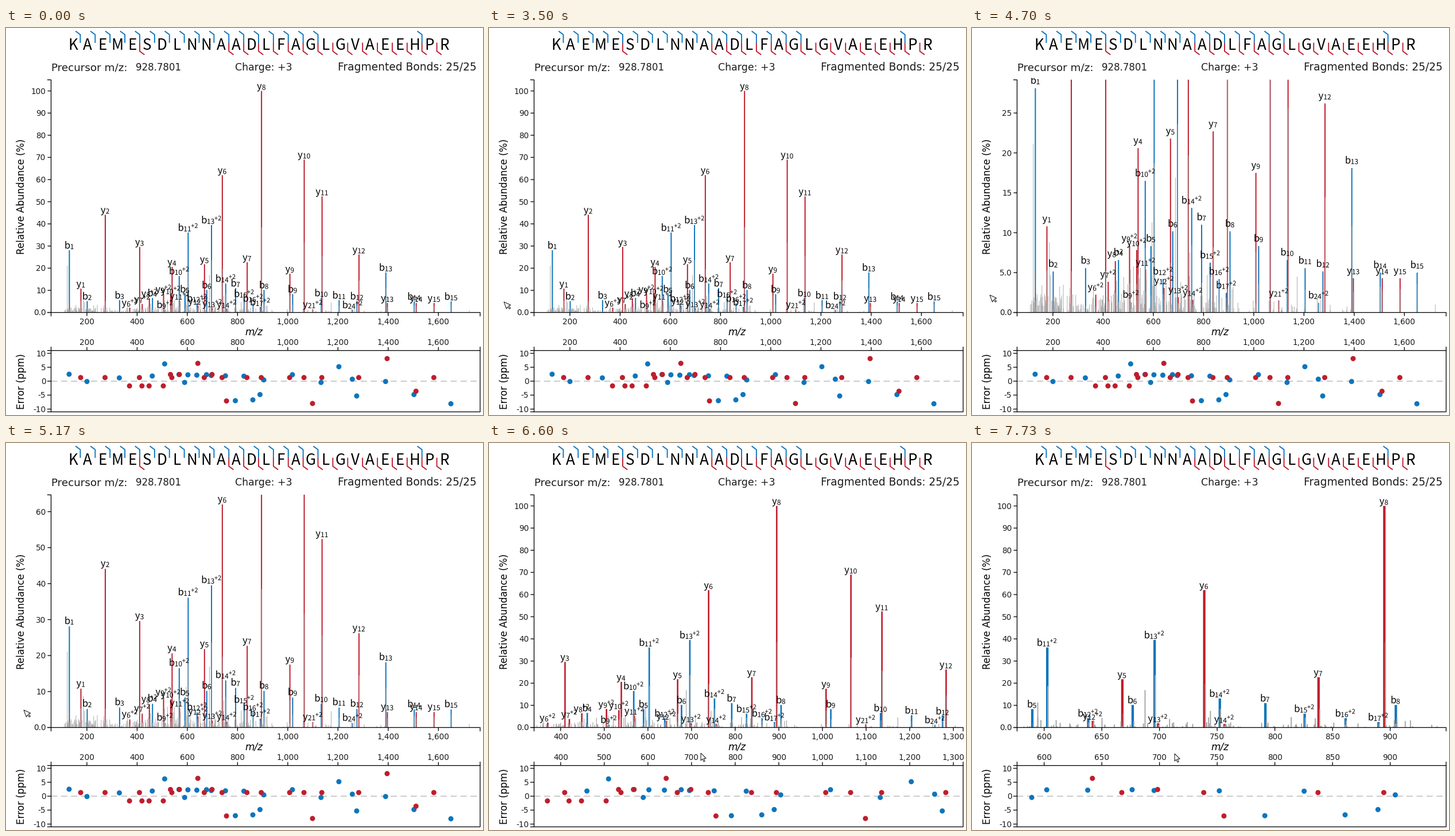
Recreate the animation shown at these times as a matplotlib script. Size 831 px wide and 674 px high, loop 8000 ms.

```python
import math

import matplotlib.pyplot as plt
import numpy as np
from matplotlib.animation import FuncAnimation
from matplotlib.collections import LineCollection, PathCollection
from matplotlib.patches import Polygon, Rectangle
from matplotlib.path import Path
from matplotlib.textpath import TextPath
from matplotlib.transforms import IdentityTransform

W, H, DPI = 831, 674, 100
PT = 72 / DPI
FRAMES, STEP = 160, 50
BLUE, RED, GREY, INK = "#0d75bc", "#be1e2d", "#a6a6a6", "#1a1a1a"
WIDE, PLAIN = "DejaVu Sans", "Noto Sans CJK JP"

# Plot boxes in pixels
LEFT, RIGHT, TOP, BASE = 78.5, 826, 90.3, 495.5
ERR_TOP, ERR_END, ERR_PX = 561.7, 668.5, 4.855
ERR_ZERO = (ERR_TOP + ERR_END) / 2
MZ_LO, MZ_SPAN, MZ_FOCUS, MAX_Y = 57.2, 1709, 721, 105

# ---------------------------------------------------------------- ions
PEPTIDE = "KAEMESDLNNAADLFAGLGVAEEHPR"
MASS = dict(K=128.095, A=71.037, E=129.043, M=131.040, S=87.032, D=115.027,
            L=113.084, N=114.043, F=147.068, G=57.021, V=99.068, H=137.059,
            P=97.053, R=156.101)
PROTON, WATER = 1.00728, 18.01056


def bell(n, mid, width):
    return math.exp(-((n - mid) / width) ** 2)


# Typical relative abundance and error (ppm) along each ion series
AMOUNT_RULE = {
    "b1": lambda n: 5 + 6 * bell(n, 7, 2.6),
    "b2": lambda n: 1.2 + 6 * bell(n, 14, 2.4),
    "y1": lambda n: 4.3,
    "y2": lambda n: 1.5 + 7 * bell(n, 9.3, 2.2),
}
ERROR_RULE = {
    "b1": lambda n: 1 + 1.5 * math.cos(2 * math.pi * (n - 1) / 2.6),
    "b2": lambda n: 2.4 - .12 * (n - 10),
    "y1": lambda n: 1.3,
    "y2": lambda n: -1.7 if n < 10 else 2.4,
}
# Ions that stand out from their series
STRONG = {"y8": 100, "y10": 69, "y6": 62, "y11": 52.4, "y2": 44.1, "y3": 29.6,
          "y12": 26.2, "y7": 22.7, "y5": 21.8, "y4": 20.6, "y9": 17.5,
          "y1": 10.8, "b13+2": 39.5, "b11+2": 36.1, "b10+2": 16.5,
          "b14+2": 13.1, "b1": 28.1, "b13": 18.1}
OUTLIERS = {"y13": 8.1, "y12+2": 6.4, "b9+2": 6.2, "b11": 5.2, "y14": -3.6,
            "b14": -4.8, "b17+2": -4.8, "b12": -5.3, "b16+2": -6.7, "b7": -7,
            "y14+2": -7.1, "y21+2": -8, "b15": -8.1}


def ion_mz(kind, num, z):
    part = PEPTIDE[:num] if kind == "b" else PEPTIDE[-num:]
    total = sum(MASS[c] for c in part) + (WATER if kind == "y" else 0)
    return total / z + PROTON


ions = ([("b", n, 1) for n in range(1, 16)]
        + [("b", n, 2) for n in [*range(9, 18), 24]]
        + [("y", n, 1) for n in range(1, 16)]
        + [("y", n, 2) for n in [*range(6, 15), 21]])
tags = [f"{k}{n}" + ("+2" if z == 2 else "") for k, n, z in ions]


def values(rule, special):
    return np.array([special.get(tag, rule[f"{k}{z}"](n))
                     for tag, (k, n, z) in zip(tags, ions)])


mz = np.array([ion_mz(*i) for i in ions])
charge = np.array([z for _, _, z in ions])
amount = values(AMOUNT_RULE, STRONG)
error = values(ERROR_RULE, OUTLIERS)
colors = [BLUE if i[0] == "b" else RED for i in ions]

# Unassigned peaks: dense and sparse noise, a few tall ones, isotopes
rng = np.random.default_rng(11)
tall = np.array([(121, 21.1), (185, 8.8), (594, 11.3), (687, 16.9),
                 (743.7, 7.5), (1172, 4.5), (1722, 1)])
grey_mz = np.concatenate([rng.uniform(100, 920, 270),
                          rng.uniform(920, 1400, 32),
                          tall[:, 0], mz + 1.00335 / charge])
grey_y = np.concatenate([.3 + rng.exponential(1.15, 270).clip(0, 6),
                         .2 + rng.exponential(.6, 32),
                         tall[:, 1], amount * mz * charge * .00043])

# ---------------------------------------------------------------- motion
# Pointer stops: time, x, y
CURSOR = np.array([
    (30, 1, 16), (300, 32, 95), (830, 24, 264), (1150, 2, 474),
    (1600, 71, 256), (1690, 71, 256), (1950, 74, 102), (2500, 50, 310),
    (2730, 50, 358), (2870, 50, 358), (3250, 21, 480), (3500, 26, 477),
    (3650, 31, 465), (5899, 31, 465), (5900, 51, 510), (6120, 230, 545),
    (6300, 369, 540), (7570, 369, 540), (7700, 353, 541)])


def ramp(t, start, end, power=1):
    return min(max((t - start) / (end - start), 0), 1) ** power


def x_zoom(t):
    return 2 ** (.2 * (7 * ramp(t, 6428, 6730) + 4 * ramp(t, 7050, 7300)))


def y_zoom(t):
    return 1.2 ** (9.1 * ramp(t, 3600, 3970) - 6.2 * ramp(t, 4330, 4970, 2)
                   - 2.9 * ramp(t, 5130, 5370))


def ticks(lo, hi, count):
    raw = (hi - lo) / count
    step = 10 ** math.floor(math.log10(raw))
    ratio = raw / step
    step *= (10 if ratio >= 50 ** .5 else 5 if ratio >= 10 ** .5
             else 2 if ratio >= 2 ** .5 else 1)
    return np.arange(math.ceil(lo / step), math.floor(hi / step) + 1) * step


# ---------------------------------------------------------------- stage
fig = plt.figure(figsize=(W / DPI, H / DPI), dpi=DPI, facecolor="white")
ax = fig.add_axes([0, 0, 1, 1])
ax.set(xlim=(0, W), ylim=(H, 0))
ax.axis("off")


def label(x, y, s, px, font=WIDE, ha="center", **kw):
    kw.setdefault("va", "baseline")
    kw.setdefault("color", INK)
    return ax.text(x, y, s, fontsize=px * PT, family=font, ha=ha, **kw)


def line(xs, ys, color="black", px=1.3, **kw):
    return ax.plot(xs, ys, color=color, lw=px * PT, snap=False, **kw)[0]


def clip(artist, x0, y0, x1, y1):
    artist.set_clip_path(Rectangle((x0, y0), x1 - x0, y1 - y0,
                                   transform=ax.transData))


def segments(color, zorder, clipped=True):
    coll = LineCollection([], colors=color, lw=1.3 * PT, zorder=zorder)
    coll.set_snap(False)
    ax.add_collection(coll, autolim=False)
    if clipped:
        clip(coll, LEFT, TOP, RIGHT, BASE)
    return coll


# Sequence with cleavage marks
PITCH = 25.88
for i, c in enumerate(PEPTIDE):
    label(116.3 + PITCH * i, 38, c, 26, PLAIN, color="black")
for kind, num in {i[:2] for i in ions}:
    bond = num if kind == "b" else len(PEPTIDE) - num
    x = 116.5 + PITCH * (bond - .5)
    if kind == "b":
        line([x - 7.5, x, x], [6, 11.5, 25], BLUE, 1.9)
    else:
        line([x, x, x + 7.5], [26.5, 40.5, 46], RED, 1.9)

label(79, 74.5, "Precursor m/z:", 18.4, ha="left")
label(305, 74.5, "928.7801", 16.6, ha="right")
label(449, 74.5, "Charge: +3", 17.4)
label(820, 74.5, "Fragmented Bonds: 25/25", 18.7, ha="right")
label(27, 293, "Relative Abundance (%)", 16.7, rotation=90, va="center",
      color="black")
label(27, 615, "Error (ppm)", 16.8, rotation=90, va="center", color="black")
label(431.5, 535, "m/z", 16.9, style="italic", color="black")


# Axes with outer ticks
def bracket_y(y0, y1):
    line([LEFT - 6, LEFT, LEFT, LEFT - 6], [y0, y0, y1, y1], zorder=6)


def bracket_x(y, tick):
    line([LEFT, LEFT, RIGHT, RIGHT], [y + tick, y, y, y + tick], zorder=6)


bracket_y(TOP, BASE)
bracket_x(BASE, 6)
bracket_y(ERR_TOP, ERR_END)
bracket_x(ERR_TOP, -6)
line([LEFT, RIGHT, RIGHT], [ERR_END, ERR_END, ERR_TOP], zorder=6)
line([LEFT, RIGHT], [ERR_ZERO, ERR_ZERO], "#ababab", 1.2,
     dashes=(9, 5.5), zorder=1)
for v in range(-10, 11, 5):
    y = ERR_ZERO - ERR_PX * v
    line([LEFT - 6, LEFT], [y, y])
    label(69.5, y + 5, str(v), 13.6, ha="right")

# Moving parts
sticks = segments(colors, 2)
greys = segments(GREY, 3)
tick_marks = segments("black", 6, clipped=False)
low_names = [label(0, 516, "", 13.6) for _ in range(18)]
high_names = [label(0, 552.5, "", 13.6) for _ in range(18)]
side_names = [label(69.5, 0, "", 13.6, ha="right") for _ in range(18)]


def ion_path(kind, num, z):
    """Ion name with subscript and charge, centred on x = 0."""
    parts, x = [], 0
    bits = [(kind, 16.5, 0), (str(num), 12, -1)]
    if z > 1:
        bits.append((f"+{z}", 11, 5))
    for s, px, rise in bits:
        p = TextPath((x, rise), s, size=px, prop={"family": PLAIN})
        parts.append(p)
        x = p.get_extents().x1 + .4
    whole = Path.make_compound_path(*parts)
    return Path(whole.vertices - [x / 2, 0], whole.codes)


names = PathCollection([ion_path(*i) for i in ions],
                       offsets=np.zeros((len(ions), 2)),
                       offset_transform=ax.transData,
                       transform=IdentityTransform(),
                       facecolors="black", linewidths=0, zorder=5)
ax.add_collection(names, autolim=False)
clip(names, LEFT, 87, RIGHT, BASE)
dots = ax.scatter(mz, error, s=(9 * PT) ** 2, c=colors, lw=0, zorder=4)
clip(dots, LEFT, ERR_TOP, RIGHT, ERR_END)

ARROW = .9 * np.array([(0, 0), (0, 14.5), (3.3, 11.4), (5.6, 16.6),
                       (7.9, 15.6), (5.6, 10.5), (10.2, 10.2)])
turn = math.radians(20)
TILTED = ARROW @ np.array([[math.cos(turn), -math.sin(turn)],
                           [math.sin(turn), math.cos(turn)]])
arrow = Polygon(ARROW, closed=True, fc="white", ec="#222222", lw=1.1 * PT,
                zorder=9)
ax.add_patch(arrow)
beam = line([], [], "#222222", 1.1, zorder=9)
BEAM = np.array([(-3.5, -6), (3.5, -6), (0, -6), (0, 6), (-3.5, 6), (3.5, 6)])


def stems(x, top):
    ends = np.empty((len(x), 2, 2))
    ends[:, :, 0] = x[:, None]
    ends[:, 0, 1] = BASE
    ends[:, 1, 1] = top
    return ends


def fill(pool, texts, xs=None, ys=None):
    for k, item in enumerate(pool):
        item.set_visible(k < len(texts))
        if k < len(texts):
            item.set_text(texts[k])
            if xs is not None:
                item.set_x(xs[k])
            if ys is not None:
                item.set_y(ys[k])


def draw(frame):
    t = frame * STEP
    zoom, top = x_zoom(t), MAX_Y / y_zoom(t)
    lo = MZ_FOCUS - (MZ_FOCUS - MZ_LO) / zoom
    span = MZ_SPAN / zoom

    def px(v):
        return LEFT + (v - lo) * (RIGHT - LEFT) / span

    def py(v):
        return BASE - v * (BASE - TOP) / top

    # Peaks, names and errors
    width = 2 * zoom ** .5
    sticks.set_segments(stems(px(mz) + .22 * width, py(amount)))
    sticks.set_linewidth(width * PT)
    greys.set_segments(stems(px(grey_mz) + .22 * width, py(grey_y)))
    greys.set_linewidth(.45 * width * PT)
    names.set_offsets(np.column_stack([px(mz), py(amount + .5) - 1]))
    dots.set_offsets(np.column_stack([px(mz), ERR_ZERO - ERR_PX * error]))

    # Ticks
    xv, yv = ticks(lo, lo + span, 10), ticks(0, top, 8)
    xs, ys = px(xv), py(yv)
    marks = [[(x, BASE), (x, BASE + 6)] for x in xs]
    marks += [[(x, ERR_TOP - 6), (x, ERR_TOP)] for x in xs]
    marks += [[(LEFT - 6, y), (LEFT, y)] for y in ys]
    tick_marks.set_segments(marks)
    texts = [f"{v:,.0f}" for v in xv]
    fill(low_names, texts, xs=xs)
    fill(high_names, texts, xs=xs)
    fill(side_names, [f"{v:.1f}" if v < 9.99 else f"{v:.0f}" for v in yv],
         ys=ys + 5)

    # Pointer: arrow, or a text beam over the tick labels
    spot = np.array([np.interp(t, CURSOR[:, 0], CURSOR[:, k]) for k in (1, 2)])
    typing = 1580 <= t < 1760
    arrow.set_visible(t >= 30 and not typing)
    arrow.set_xy((TILTED if 2900 <= t < 5900 else ARROW) + spot)
    beam.set_visible(typing)
    beam.set_data(*(BEAM + spot).T)
    return []


anim = FuncAnimation(fig, draw, frames=FRAMES, interval=STEP, repeat=True,
                     repeat_delay=0, init_func=lambda: draw(0), blit=False)
plt.show()
```
